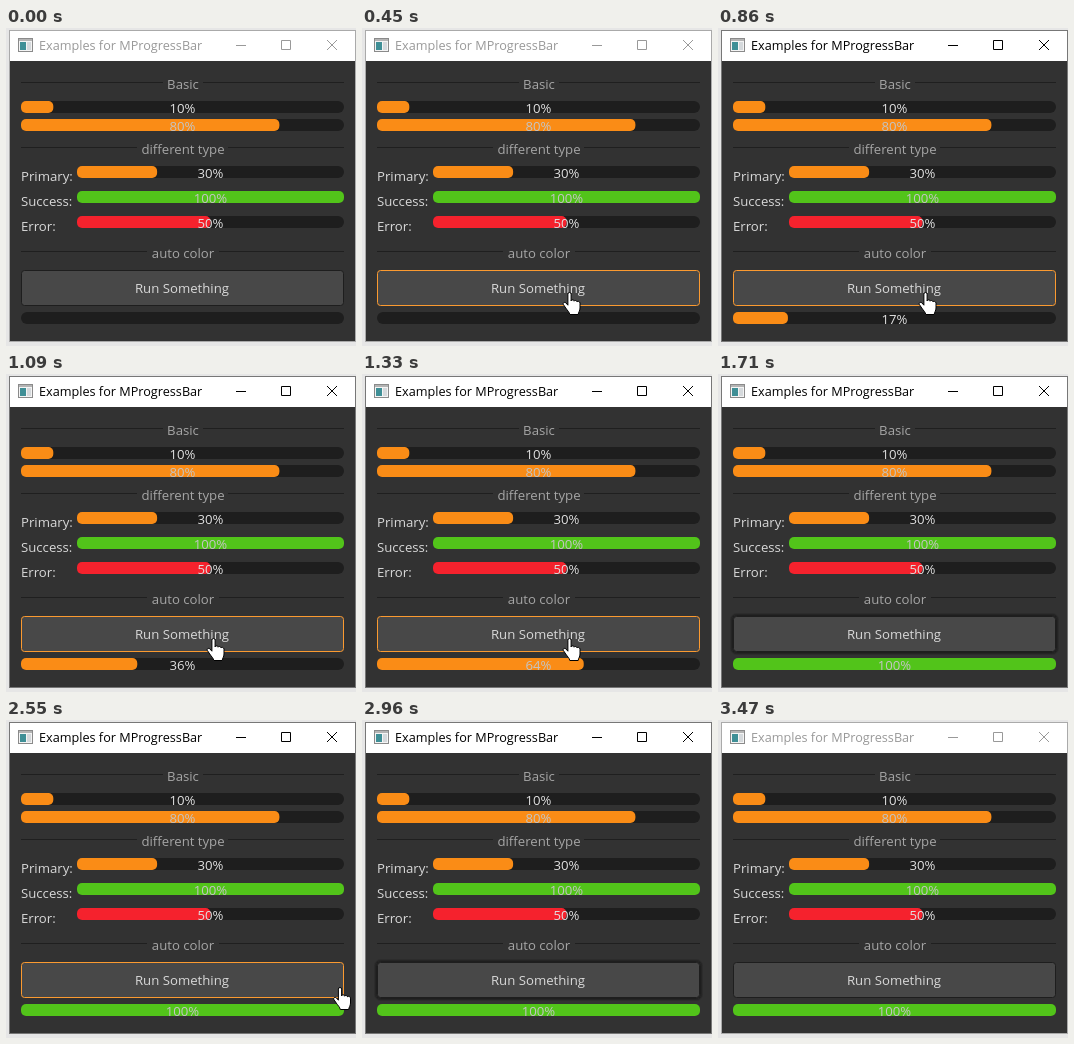
An HTML page that plays this animation: 350x318 px, repeating every 3.52 s.

```html
<!DOCTYPE html>
<html lang="en">
<head>
<meta charset="utf-8">
<title>Progress bars</title>
<style>
  html, body { margin: 0; width: 100%; height: 100%; overflow: hidden; background: #e6e6e6; }
  svg { display: block; width: 350px; height: 318px; }
  text { font: 13.2px "Open Sans", "Noto Sans", sans-serif; fill: #d9d9d9; font-variant-ligatures: none; }
  .mid { text-anchor: middle; }
  .muted { fill: #a6a6a6; }
  .title { font-size: 12.67px; }
</style>
</head>
<body>
<svg id="stage" viewBox="0 0 350 318"></svg>
<script>
const LOOP = 3520;
const ORANGE = '#fa8c16', GREEN = '#52c41a', RED = '#f5222d';
const stage = document.getElementById('stage');
const $ = id => document.getElementById(id);

const rect = (x, y, w, h, fill, extra = '') =>
  `<rect x="${x}" y="${y}" width="${w}" height="${h}" fill="${fill}" ${extra}/>`;
const text = (x, y, s, cls = '', extra = '') =>
  `<text x="${x}" y="${y}" class="${cls}" ${extra}>${s}</text>`;

function divider(y, label, left, right) {
  return rect(15, y, left - 15, 1, '#1f1f1f') + rect(right, y, 338 - right, 1, '#1f1f1f') +
    text(177, y + 7, label, 'mid muted');
}

function bar(x, y, value, color) {
  const w = 338 - x, fillW = w * value / 100;
  const track = rect(x, y, w, 12, '#1e1e1e', 'rx="6"');
  if (value === null) return track;
  return track + rect(x, y, fillW, 12, color, `rx="${Math.min(5, fillW / 2)}"`) +
    text(x + w / 2, y + 12, value + '%', 'mid', `style="fill:${value > 50 ? '#c4c4c4' : '#e0e0e0'}"`);
}

const row = (y, label, value, color) => text(15, y + 15, label) + bar(71, y, value, color);

const arrow = 'M0 0V16L3.7 12.6L6.2 18.4L8.6 17.4L6.1 11.8H11.2Z';
const hand = 'M-1.6 1.6a1.6 1.6 0 0 1 3.2 0V8.5c0-1.6 3-1.4 3 .2 .3-1.2 3-.9 3 .7 ' +
  '.3-1 2.9-.7 2.9 1.2V15.5c0 3-1.6 4-1.8 6.5H.3c-.4-2.4-2.6-4.2-4-6.4l-2.4-3.6' +
  'c-1-1.6 1.4-2.9 2.6-1.5l1.9 2.2z';

stage.innerHTML =
  rect(0, 0, 350, 318, '#e6e6e6') +
  rect(3, 2, 347, 312, '#aaa', 'id="frame"') +
  rect(4, 3, 345, 30, '#fff') +
  rect(4, 33, 345, 280, '#323232') +
  // title bar
  rect(12.5, 10.5, 14, 13, '#f4f4f4', 'stroke="#8a8a8a"') +
  rect(13, 11, 13, 2, '#b4b4b4') +
  rect(14, 14, 6, 8, '#3f8f96') + rect(21, 14, 4, 8, '#d5d9dc') +
  text(33, 22, 'Examples for MProgressBar', 'title', 'id="title"') +
  '<path id="controls" fill="none" d="M230 17.5h10M275.5 12.5h9v9h-9zM321 12l10 10M331 12l-10 10"/>' +
  // content
  divider(54, 'Basic', 157, 197) +
  bar(15, 73, 10, ORANGE) + bar(15, 91, 80, ORANGE) +
  divider(119, 'different type', 131, 222) +
  row(138, 'Primary:', 30, ORANGE) +
  row(163, 'Success:', 100, GREEN) +
  row(188, 'Error:', 50, RED) +
  divider(223, 'auto color', 141, 213) +
  '<g id="glow" fill="none" stroke="#111">' +
    [[2, .18], [1, .4], [0, .6]].map(([d, o]) =>
      rect(14.5 - d, 241.5 - d, 324 + 2 * d, 37 + 2 * d, 'none', `rx="${4 + d}" opacity="${o}"`)).join('') +
  '</g>' +
  rect(15.5, 242.5, 322, 35, '#484848', 'id="button" rx="3"') +
  text(176, 265, 'Run Something', 'mid') +
  '<g id="auto"></g>' +
  '<path id="cursor" fill="#fff" stroke="#000" stroke-linejoin="round"/>';

const mix = (a, b, k) => a + (b - a) * k;
const clamp = v => Math.max(0, Math.min(1, v));
const snap = (t, from, step) => from + Math.floor((t - from) / step) * step;

// Pointer tip at time t, or null while it is away.
function pointer(t) {
  if (t >= 270 && t < 1710) {
    const k = clamp((snap(t, 270, 45) - 270) / 180);
    const out = 1 - (1 - k) ** 2;
    return [mix(199, 207.5, out), mix(308, 264.5, out)];
  }
  if (t >= 2550 && t < 2960) {
    const k = clamp((snap(t, 2550, 41) - 2550) / 369);
    return [334 - 18 * k + 32 * k * k, mix(267.5, 74, k ** 1.4)];
  }
  if (t >= 3200 && t < 3290) return t < 3245 ? [334, 312] : [339, 306];
  return null;
}

function progress(t) {
  if (t < 690) return null;
  return Math.max(0, Math.min(100, Math.round((snap(t, 860, 47) - 690) / 10)));
}

let shown;
function draw(t) {
  const active = t >= 630 && t < 3470;
  const tip = pointer(t);
  const hover = !!tip && tip[0] < 338 && tip[1] >= 242 && tip[1] < 278;

  $('frame').setAttribute('fill', active ? '#777' : '#aaa');
  $('title').style.fill = active ? '#000' : '#999';
  $('controls').setAttribute('stroke', active ? '#000' : '#999');
  $('glow').style.display = active && !hover ? '' : 'none';
  $('button').setAttribute('stroke', hover ? '#fb9a30' : '#1e1e1e');

  const value = progress(t);
  if (value !== shown) {
    $('auto').innerHTML = bar(15, 284, value, value === 100 ? GREEN : ORANGE);
    shown = value;
  }

  const cursor = $('cursor');
  cursor.style.display = tip ? '' : 'none';
  if (tip) {
    cursor.setAttribute('d', hover ? hand : arrow);
    cursor.setAttribute('transform', `translate(${tip})`);
  }
}

const start = performance.now();
function tick() {
  draw((performance.now() - start) % LOOP);
  requestAnimationFrame(tick);
}
tick();
</script>
</body>
</html>
```
